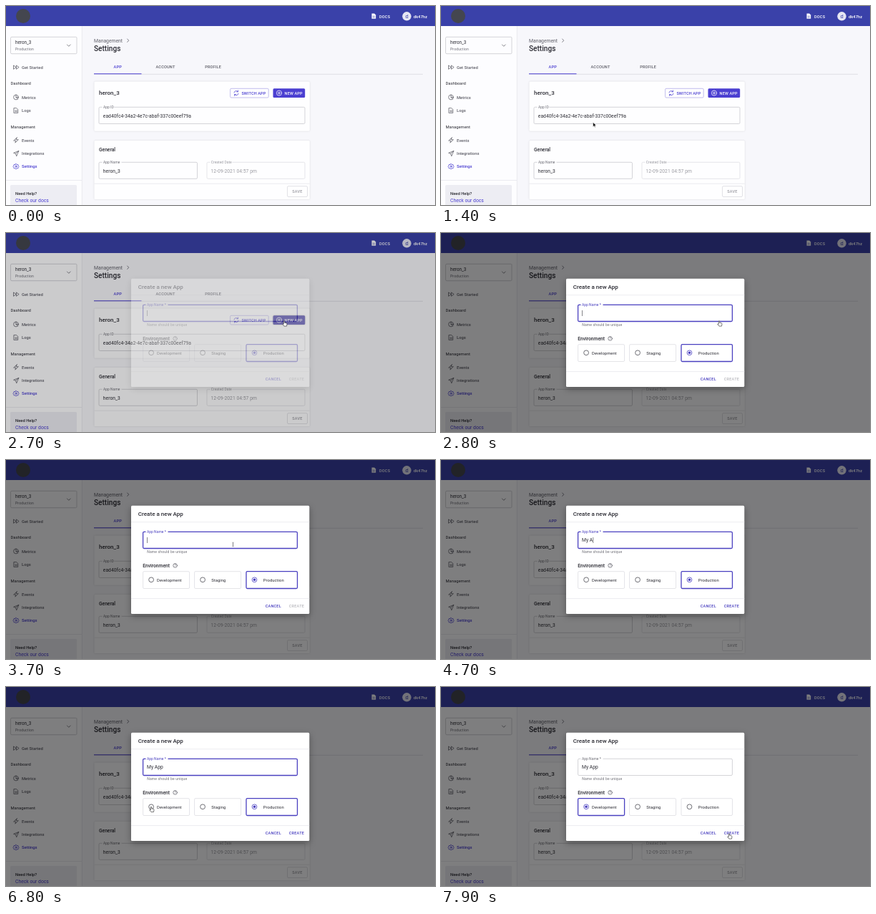
An HTML page for the animation above (8000 ms loop, 600 by 278 pixels).

```html
<!DOCTYPE html>
<html lang="en">
<head>
<meta charset="utf-8">
<title>Create a new app</title>
<style>
  html, body { margin: 0; width: 100%; height: 100%; overflow: hidden; background: #f7f7fb; }
  svg { display: block; width: 100%; height: 100%; }
  text { font: 5.85px Roboto, sans-serif; fill: #2b2b33; white-space: pre; }
  .medium { font-weight: 500; }
  .body { font-size: 6.7px; letter-spacing: .06px; }
  .heading { font-size: 6.7px; font-weight: 500; }
  .title { font-size: 8.05px; font-weight: 500; }
  .label { font-size: 5px; fill: #6d6d75; }
  .caption { font-size: 5px; letter-spacing: .17px; fill: #6d6d75; }
  .button { font-size: 5.6px; font-weight: 500; letter-spacing: .16px; }
  .muted { fill: #5f5f68; }
  .faint { fill: #9c9ca3; }
  .accent { fill: #4b3fd1; }
  .white { fill: #fff; }
  .icon { fill: none; stroke: #5b5b64; stroke-width: .75; stroke-linejoin: round; stroke-linecap: round; }
  .field { fill: none; stroke: #c2c2c8; stroke-width: .7; }
  .rule { stroke: #e4e4ea; stroke-width: .7; }
  .card { fill: #fefeff; filter: drop-shadow(0 .4px .8px #0002); }
  .radio rect { fill: none; stroke: #d8d8de; stroke-width: .7; }
  .radio circle { fill: none; stroke: #4c4c54; stroke-width: .8; }
  .radio .dot { display: none; }
  .radio.on rect { stroke: #4a40c0; stroke-width: 1.3; }
  .radio.on circle { stroke: #4a40c0; }
  .radio.on .dot { display: inline; fill: #4a40c0; stroke: none; }
  #nameField.on { stroke: #4a40c0; stroke-width: 1.3; }
  #nameLabel.on { fill: #4a40c0; }
  #newApp.on { fill: #332b9c; filter: drop-shadow(0 .8px 1px #0005); }
  #create { fill: #b9b9be; }
  #create.on { fill: #4a40c0; }
</style>
</head>
<body>
<svg viewBox="0 0 600 278" preserveAspectRatio="none">
  <rect width="600" height="278" fill="#f7f7fb"/>

  <!-- Sidebar -->
  <rect y="28" width="106" height="250" fill="#fdfdff"/>
  <path class="rule" d="M106.3 28V278M0 243.5H106"/>
  <rect class="field" x="6.5" y="43.3" width="92.5" height="23.4" rx="1.5"/>
  <text x="13" y="53" style="font-size:6.3px">heron_3</text>
  <text class="caption" x="13" y="62">Production</text>
  <path class="icon" d="M85.5 54l2.3 2.3 2.3-2.3"/>
  <g class="medium muted">
    <text class="muted medium" x="22" y="88.1">Get Started</text>
    <text x="6.5" y="110.4">Dashboard</text>
    <text class="muted medium" x="22" y="129.8">Metrics</text>
    <text class="muted medium" x="22" y="148.1">Logs</text>
    <text x="6.5" y="170.8">Management</text>
    <text class="muted medium" x="22" y="189.8">Events</text>
    <text class="muted medium" x="22" y="208.1">Integrations</text>
    <text class="accent medium" x="22" y="226.4">Settings</text>
  </g>
  <g class="icon">
    <path d="M10.5 83.3v5l3.4-2.5zM14.4 83.3v5l3.4-2.5z"/>
    <circle cx="14" cy="127.5" r="3.4"/>
    <path d="M14 124v3.5h3.4M14 127.5l2.3 2.4"/>
    <path d="M11.3 142.6h3.4l2 2v4.8h-5.4zM12.7 146h2.7M12.7 147.7h2.7"/>
    <path d="M15.2 183.8l-4.5 4.3h3l-.9 3 4.5-4.4h-3z"/>
    <path d="M17.6 202.5l-7 2.8 3 1 1 3.2zM13.6 206.3l4-3.8"/>
    <g stroke="#4b3fd1">
      <circle cx="14" cy="224.2" r="1.2"/>
      <path d="M14 220.5l1.2 1 1.7.1.4 1.6.9 1-.9 1-.4 1.6-1.7.1-1.2 1-1.2-1-1.7-.1-.4-1.6-.9-1 .9-1 .4-1.6 1.7-.1z"/>
    </g>
  </g>
  <rect x="6" y="250" width="93" height="30" rx="1.5" fill="#ededf3"/>
  <text class="medium" x="13" y="264">Need Help?</text>
  <text class="accent" x="13" y="274.2" style="font-size:6.8px">Check our docs</text>

  <!-- Top bar -->
  <rect width="600" height="28" fill="#3a41a9"/>
  <circle cx="24" cy="14" r="10" fill="#44464f"/>
  <path class="white" d="M511.5 10.6h3.7l2 2v5.2h-5.7z"/>
  <path d="M512.7 14.2h3.2M512.7 16h3.2" stroke="#3a41a9" stroke-width=".6"/>
  <text class="button white" x="522" y="16.5">DOCS</text>
  <circle cx="560.5" cy="14.3" r="6.2" fill="#e6e6f3"/>
  <text x="560.5" y="16.9" text-anchor="middle" style="font-size:7.5px;fill:#3a41a9">d</text>
  <text class="white medium" x="570" y="16.5">dk47hz</text>

  <!-- Page heading and tabs -->
  <text class="muted" x="123" y="50.5" style="font-size:6.8px">Management</text>
  <path class="icon" d="M169.7 46l2 2.2-2 2.2"/>
  <text class="medium" x="123" y="62.8" style="font-size:10.1px">Settings</text>
  <path class="rule" d="M123 95.3H583" style="stroke:#d5d5dc"/>
  <path d="M123 94.8h66.5" stroke="#4b3fd1" stroke-width="1.1"/>
  <g text-anchor="middle">
    <text class="button accent" x="156.3" y="87.2">APP</text>
    <text class="button muted" x="223" y="87.2">ACCOUNT</text>
    <text class="button muted" x="289.6" y="87.2">PROFILE</text>
  </g>

  <!-- App card -->
  <rect class="card" x="123.4" y="105.5" width="301.4" height="69.2" rx="1.6"/>
  <text class="title" x="130" y="124.3">heron_3</text>
  <rect x="313.6" y="115.3" width="53.6" height="12.7" rx="1.5" fill="none" stroke="#a9a3e6" stroke-width=".7"/>
  <path class="icon" style="stroke:#4b3fd1" d="M319 121a3 3 0 0 1 5.2-1.4M325 122.3a3 3 0 0 1-5.2 1.4M324.5 118v1.8h-1.8M319.5 125.3v-1.8h1.8"/>
  <text class="button accent" x="329.4" y="123.7" style="font-size:5.5px">SWITCH APP</text>
  <rect id="newApp" class="accent" x="373.5" y="115.2" width="44.7" height="12.8" rx="1.5"/>
  <g class="icon" style="stroke:#fff">
    <circle cx="382" cy="121.6" r="3.6"/><path d="M380.2 121.6h3.6M382 119.8v3.6"/>
  </g>
  <text class="button white" x="389.6" y="123.7" style="font-size:5.5px">NEW APP</text>
  <rect class="field" x="130" y="141.3" width="288" height="23.2" rx="1.5"/>
  <rect x="134.5" y="140" width="17" height="3" fill="#fefeff"/>
  <text class="label" x="136" y="143.1">App ID</text>
  <text class="body" x="135.8" y="155.6">ead40fc4-34a2-4e7c-abaf-337c00eef79a</text>

  <!-- General card -->
  <rect class="card" x="123.4" y="188" width="301.4" height="82" rx="1.6"/>
  <text class="heading" x="130" y="203.2">General</text>
  <rect class="field" x="130" y="218.3" width="137.5" height="23" rx="1.5"/>
  <rect class="field" x="281" y="218.3" width="137" height="23" rx="1.5" style="stroke:#dcdce1"/>
  <path d="M134.5 218.3h27M285.5 218.3h31" stroke="#fefeff" stroke-width="2"/>
  <text class="label" x="136" y="220.1">App Name</text>
  <text class="body" x="135.8" y="232.5">heron_3</text>
  <text class="label faint" x="286.8" y="220.1" style="fill:#9c9ca3">Created Date</text>
  <text class="body faint" x="286.4" y="232.5">12-09-2021 04:57 pm</text>
  <path class="rule" d="M123.4 248.2h301.4"/>
  <rect class="field" x="393.5" y="251.7" width="28" height="14.8" rx="1.5" style="stroke:#d6d6dc"/>
  <text class="button faint" x="400.2" y="261.2">SAVE</text>

  <!-- Dialog -->
  <rect id="backdrop" width="600" height="278"/>
  <g id="dialog">
    <rect x="175" y="63.8" width="249.3" height="151.2" rx="1.6" fill="#fff" style="filter:drop-shadow(0 3px 5px #0005)"/>
    <text class="title" x="184.8" y="77.6">Create a new App</text>
    <path class="rule" d="M175 86.7h249.3M175 193.6h249.3"/>
    <rect id="nameField" class="field" x="191.6" y="100.3" width="215.8" height="23.2" rx="1.5"/>
    <rect x="195.5" y="99" width="31" height="3" fill="#fff"/>
    <text id="nameLabel" class="label" x="197" y="102.1">App Name *</text>
    <text id="name" class="body" x="197" y="114.4"></text>
    <path id="caret" d="M0 108v8" stroke="#33333b" stroke-width=".6"/>
    <text class="caption" x="197.2" y="130.2">Name should be unique</text>
    <text class="heading" x="191.3" y="149.7">Environment</text>
    <circle class="icon" cx="236.6" cy="147.4" r="2.8"/>
    <text class="label medium" x="236.6" y="149.1" text-anchor="middle" style="font-size:4.6px">?</text>
    <g id="radios"></g>
    <text class="button" x="362.7" y="206.3" style="fill:#4a40c0">CANCEL</text>
    <text id="create" class="button" x="395.8" y="206.3">CREATE</text>
  </g>

  <!-- Pointers, with the hot spot at the origin -->
  <g id="arrow" fill="#111" stroke="#fff" stroke-width=".5">
    <path d="M0 0v6.2l1.5-1.3 1 2.2 1-.5-1-2.1h2z"/>
  </g>
  <g id="hand" fill="#fff" stroke="#222" stroke-width=".6" stroke-linejoin="round">
    <path d="M-.7.6q.7-1.2 1.4 0v2.2l2.6.6q.8.3.7 1.2l-.5 3h-3.6l-2.2-2.8q0-.9 1.6.1z"/>
  </g>
  <path id="beam" d="M-1.1-3q1.1 0 1.1.8v4.4q0 .8-1.1.8M1.1-3q-1.1 0-1.1.8v4.4q0 .8 1.1.8" fill="none" stroke="#55555c" stroke-width=".5"/>
</svg>
<script>
const LOOP = 8000, FRAME = 100;
const OPEN = 2700, SELECT = 7000;
const keystrokes = [3800, 4100, 4500, 4700, 4900, 5000];
const appName = "My App";
const path = [ // time, x, y
  [1100, 131, 181], [1900, 389, 122.5], [2800, 389, 122.5], [3300, 317.5, 118],
  [5200, 317.5, 118], [5800, 264, 179], [6100, 250, 185], [6200, 250, 185],
  [6800, 203, 167], [7100, 203, 167], [7900, 403, 204.5]
];
const $ = id => document.getElementById(id);
const setOn = (element, on) => element.classList.toggle("on", on);
const show = (element, visible) => element.style.display = visible ? "inline" : "none";

$("radios").innerHTML = [
  ["Development", 191.6, 65, 211], ["Staging", 263.6, 65, 287.2], ["Production", 336, 71.5, 359.8]
].map(([name, x, width, textX]) => `<g class="radio">
  <rect x="${x}" y="155.7" width="${width}" height="23.8" rx="1.5"/>
  <circle cx="${x + 11.5}" cy="167.3" r="3.4"/>
  <circle class="dot" cx="${x + 11.5}" cy="167.3" r="1.8"/>
  <text x="${textX}" y="169.5" style="letter-spacing:.05px">${name}</text></g>`).join("");
const [development, , production] = $("radios").children;

function pointerAt(time) {
  const next = path.findIndex(key => key[0] >= time);
  if (next < 1) return path.at(next).slice(1);
  const [t0, x0, y0] = path[next - 1], [t1, x1, y1] = path[next];
  const u = (time - t0) / (t1 - t0), ease = u * u * (3 - 2 * u);
  return [x0 + (x1 - x0) * ease, y0 + (y1 - y0) * ease];
}

function pointerShape(time, x, y) {
  const inside = (left, top, right, bottom) => x > left && x < right && y > top && y < bottom;
  if (time <= 2800) return inside(373, 115, 419, 128) ? "hand" : "arrow";
  if (inside(191, 100, 408, 124)) return "beam";
  const overRadio = inside(191, 155, 257, 179) || inside(264, 155, 329, 179);
  return overRadio || inside(394, 199, 420, 212) ? "hand" : "arrow";
}

function draw(time) {
  const opened = time >= OPEN, fading = time < OPEN + FRAME;
  $("backdrop").style.opacity = !opened ? 0 : fading ? .2 : .5;
  $("dialog").style.opacity = !opened ? 0 : fading ? .32 : 1;

  const typed = keystrokes.filter(key => key <= time);
  const focused = time < SELECT;
  const caretStart = typed.at(-1) ?? OPEN;
  $("name").textContent = appName.slice(0, typed.length);
  $("caret").setAttribute("transform", `translate(${197.5 + (typed.length && $("name").getComputedTextLength())} 0)`);
  show($("caret"), focused && Math.floor((time - caretStart) / 500) % 2 === 0);
  setOn($("nameField"), focused);
  setOn($("nameLabel"), focused);
  setOn($("create"), typed.length > 0);
  setOn(development, !focused);
  setOn(production, focused);

  const [x, y] = pointerAt(time), shape = pointerShape(time, x, y);
  const visible = time >= 1200 && !(time >= 3800 && time < 5300);
  setOn($("newApp"), visible && time <= OPEN && shape === "hand");
  for (const id of ["arrow", "hand", "beam"]) {
    show($(id), visible && id === shape);
    $(id).setAttribute("transform", `translate(${x} ${y})`);
  }
}

const start = performance.now();
function tick() {
  const time = (performance.now() - start) % LOOP;
  draw(Math.floor(time / FRAME) * FRAME);
  requestAnimationFrame(tick);
}
tick();
</script>
</body>
</html>
```
